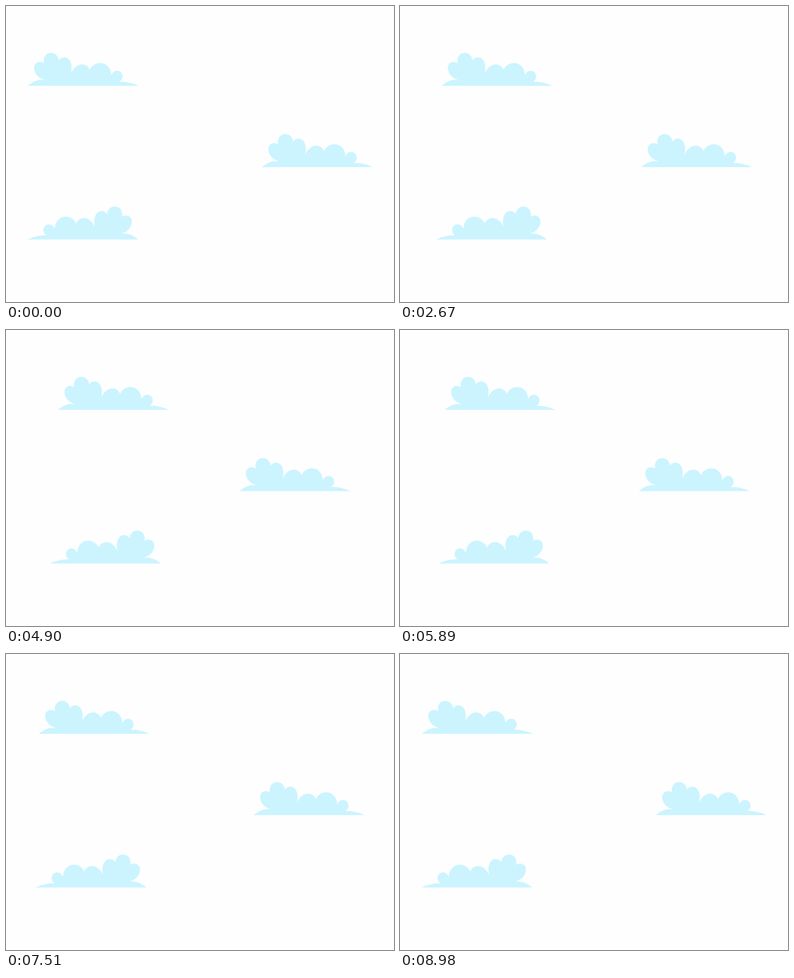
An HTML page for the animation above (9010 ms loop, 856 by 654 pixels).

```html
<!DOCTYPE html>
<html lang="en">
<head>
<meta charset="utf-8">
<title>Drifting clouds</title>
<style>
  html, body { margin: 0; width: 100%; height: 100%; overflow: hidden; background: #fefefe; }
  svg { display: block; width: 856px; height: 654px; fill: #cbf4ff; }
  .drift { animation: drift 4505ms linear infinite alternate; }
  .top { --shift: 73.2px; }
  .middle { --shift: -54.5px; }
  .bottom { --shift: 54.5px; }
  @keyframes drift {
    from { transform: translateX(0); }
    to { transform: translateX(var(--shift)); }
  }
</style>
</head>
<body>
<svg viewBox="0 0 856 654">
  <defs>
    <path id="cloud" d="M48 176.5 C57 168.5 70 160.5 86 164
      C70 159 62 148 62 137 C62 125 74 119.5 84 126.5
      C81 114 88 103.5 99.5 103.5 C109 103.5 116 111 116.5 120.5
      C119 116.5 123 113.5 128 113.5 C140 113.5 148 126 143.5 149
      C148 138 157 129 168 129 C176 129 182 134 185 141
      C189 132 198 126 208 126 C221 126 232 137 232 152.5
      C235 147 239 143 245 143 C252 143 257 149 257 155.5
      C257 161 254 165 250 167.5
      C264 166.5 281 171 292 176.5 Z"/>
  </defs>
  <g class="drift top"><use href="#cloud"/></g>
  <g class="drift middle"><use href="#cloud" transform="translate(516.7 179.5)"/></g>
  <g class="drift bottom"><use href="#cloud" transform="translate(339.5 339.5) scale(-1 1)"/></g>
</svg>
</body>
</html>
```
